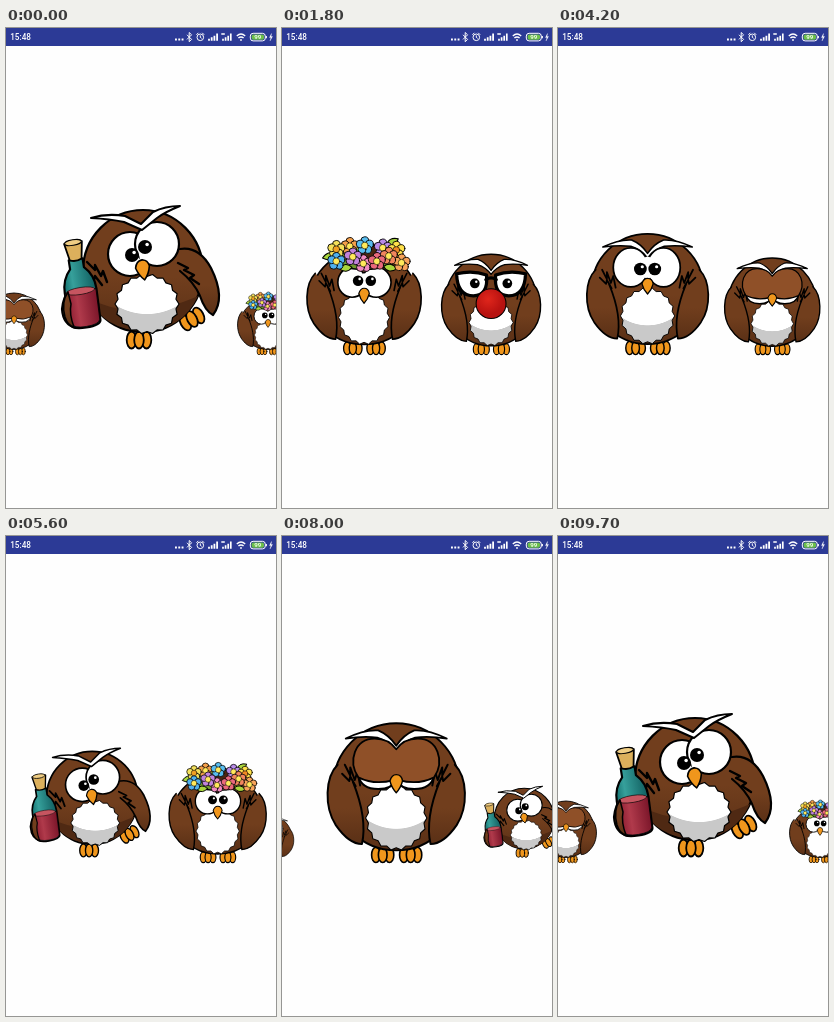
Write an HTML page that moves like this. It is 270 by 480 pixels and loops after 9800 ms.

```html
<!DOCTYPE html>
<html lang="en">
<head>
<meta charset="utf-8">
<title>Owl carousel</title>
<style>
html, body { margin: 0; width: 100%; height: 100%; overflow: hidden; background: #fefefe; }
svg { display: block; width: 100%; height: 100%; }
text { font-family: Roboto, sans-serif; font-weight: 500; fill: #fff; }
.owl { stroke: #000; stroke-linejoin: round; stroke-linecap: round; }
</style>
</head>
<body>
<svg viewBox="0 0 270 480">
  <defs>
    <radialGradient id="shaded" cx=".5" cy="-.2" fy="-.2" r="1.2">
      <stop offset=".72" stop-color="#fff"/><stop offset=".73" stop-color="#c9c9c9"/>
    </radialGradient>
    <linearGradient id="brown" x2="0" y2="1">
      <stop offset=".55" stop-color="#713e1d"/><stop offset="1" stop-color="#5a3016"/>
    </linearGradient>
    <linearGradient id="glass">
      <stop stop-color="#14706f"/><stop offset=".3" stop-color="#36a09b"/><stop offset="1" stop-color="#115e60"/>
    </linearGradient>
    <linearGradient id="wine">
      <stop stop-color="#8d1d31"/><stop offset=".35" stop-color="#b03a4b"/><stop offset="1" stop-color="#7a1529"/>
    </linearGradient>
    <radialGradient id="nose" cx=".4" cy=".35">
      <stop stop-color="#e0261c"/><stop offset="1" stop-color="#b81210"/>
    </radialGradient>
  </defs>
  <g id="carousel"></g>
  <rect width="270" height="18" fill="#2c3a96"/>
  <text x="4.2" y="12" font-size="8.2">15:48</text>
  <g fill="none" stroke="#fff" stroke-width="1">
    <path d="M169 11.500h1.900M172.300 11.500h1.900M175.600 11.500h1.900" stroke-width="1.900"/>
    <path d="M181 6.800l4.600 4.600-2.400 2.300V4.500l2.400 2.300-4.600 4.600"/>
    <circle cx="194.300" cy="9.300" r="3.300"/>
    <path d="M194.300 7.400v2l1.300.9M190.400 6.800l2-2M198.200 6.800l-2-2"/>
    <path d="M203 12.700v-2M205.700 12.700v-3.500M208.400 12.700v-5M211.100 12.700V5.500" stroke-width="1.800"/>
    <path d="M217 12.700v-2M219.600 12.700v-3.500M222.200 12.700v-5M224.800 12.700V5.500M215.300 6h3.500" stroke-width="1.700"/>
    <path d="M230.800 8q4.200-3.800 8.400 0M232.400 10q2.600-2.200 5.200 0" stroke-width="1.400"/>
    <circle cx="235" cy="12" r=".6"/>
    <rect x="244.300" y="5.300" width="15" height="7.600" rx="2.800"/>
    <rect x="245.600" y="6.500" width="12.400" height="5.200" rx="1.600" fill="#6cc04a" stroke="none"/>
    <path d="M260.300 8v2.300" stroke-width="1.200"/>
    <path d="M265.500 5.500l-2 4h1.500l-1 3.500 2.500-4.500h-1.500z" fill="#fff" stroke-width=".3"/>
  </g>
  <text x="251.800" y="11.400" font-size="6.200" text-anchor="middle">99</text>
</svg>
<script>
const BROWN = 'url(#brown)', ORANGE = '#f0961c';

const path = (d, fill = 'none', width = 2.2) => `<path d="${d}" fill="${fill}" stroke-width="${width}"/>`;
const oval = (x, y, rx, ry = rx, fill = '#fff', width = 2.2) =>
  `<ellipse cx="${x}" cy="${y}" rx="${rx}" ry="${ry}" fill="${fill}" stroke-width="${width}"/>`;
const group = (transform, content) => `<g transform="${transform}">${content}</g>`;
const bothSides = content => content + group('scale(-1 1)', content);

function belly(cx, cy, rx, ry, fill) {
  const points = Array.from({ length: 36 }, (_, i) => {
    const a = i * Math.PI / 18, r = i % 2 ? 1 : .92;
    return `${(cx + rx * r * Math.sin(a)).toFixed(1)} ${(cy - ry * r * Math.cos(a)).toFixed(1)}`;
  });
  return path(`M${points.join('L')}Z`, fill, 1.2);
}

const pupil = (x, y, r = 7) =>
  oval(x, y, r, r, '#000', 0) + oval(x + r * .3, y - r * .35, r * .25, r * .25, '#fff', 0);

const foot = (x, y, angle = 0) => group(`translate(${x} ${y}) rotate(${angle})`,
  [-7.5, 7.5, 0].map(dx => oval(dx, 0, 4.8, 8.5, ORANGE, 1.8)).join(''));

const beak = (x, y) =>
  path(`M${x - 7} ${y - 3}Q${x - 5} ${y - 10} ${x} ${y - 10}Q${x + 6} ${y - 10} ${x + 7} ${y - 3}Q${x + 5} ${y + 5} ${x} ${y + 10}Q${x - 5} ${y + 5} ${x - 7} ${y - 3}Z`, ORANGE, 1.6);

const wing = path('M-65-109C-79-95-80-62-67-42C-58-29-49-21-38-21C-33-44-40-70-48-90', BROWN);
const tuft = path('M-57-109l6 12 0-9 5 14 3-9 3 15M-60-99l8 8 1-5 6 11', 'none', 2.2);
const brows = path('M-56-138Q-36-148-20-147Q-8-142 0-130Q8-142 20-147Q36-148 56-138Q36-141 21-139Q8-135 0-124Q-8-135-21-139Q-36-141-56-138Z', '#fff', 2);

function standing(face, bellyFill = 'url(#shaded)', top = -155) {
  const ry = (-14 - top) / 2;
  return foot(-15, -9) + foot(16, -9) +
    oval(0, top + ry, 70, ry, BROWN) +
    bothSides(wing + tuft) +
    belly(0, -50, 34, 36, bellyFill) + face;
}

const plainFace = brows + oval(-21, -112, 22, 25) + oval(20, -112, 21, 25) +
  oval(0, -112, 8, 14, '#fff', 0) + pupil(-9, -110, 8) + pupil(9, -110, 8) + beak(0, -88);

const sleepyFace = brows +
  bothSides(path('M-42-97Q-39-82-20-82Q-4-82 0-93L0-102Z', '#fff')) +
  path('M-42-95C-54-113-46-138-24-138Q-8-138 0-126Q8-138 24-138C46-138 54-113 42-95Q24-86 3-92L-3-92Q-24-86-42-95Z', '#8f5028', 2) +
  beak(0, -88);

const lens = path('M-53-126Q-28-132-7-124Q-4-93-27-92Q-52-92-53-126Z', '#fff', 0) +
  path('M-53-126Q-28-132-7-124Q-4-93-27-92Q-52-92-53-126Z', 'none', 5);
const clownFace = brows + group('translate(0 1)', bothSides(lens)) +
  path('M-8-116Q0-121 8-116', 'none', 5) +
  pupil(-25, -110, 7.5) + pupil(25, -110, 7.5) + oval(0, -79, 23, 23, 'url(#nose)', 1.6);

function flower(x, y, color, core = '#ffe95a') {
  const petals = Array.from({ length: 5 }, (_, i) => {
    const a = i * Math.PI * .4;
    return oval((x + 6.5 * Math.sin(a)).toFixed(1), (y - 6.5 * Math.cos(a)).toFixed(1), 5.2, 5.2, color, 1.2);
  }).join('');
  return petals + oval(x, y, 4.5, 4.5, core, .8);
}

const leaf = (x, y, angle) => group(`translate(${x} ${y}) rotate(${angle})`,
  path('M0 0Q8-9 18 0Q8 9 0 0Z', '#a9d63c', 1.4));

const crown = oval(0, -131, 46, 17, '#6f9a2d') + oval(7, -137, 26, 9, '#4a2510') +
  [[-38, -134, 165], [-16, -117, 175], [26, -118, 10], [40, -128, 15], [-4, -140, 200], [30, -146, -30]]
    .map(a => leaf(...a)).join('') +
  flower(-19, -145, '#f5a04a') + flower(1, -146, '#58bdf0') + flower(25, -143, '#b98be8') +
  flower(43, -140, '#ffe14a', '#f08a24') + flower(-37, -141, '#f4e05a', '#f0a024') +
  flower(-37, -125, '#4fb0ee') + flower(50, -123, '#f7a35a') + flower(33, -132, '#f2855e') +
  flower(-1, -122, '#f28ac0') + flower(17, -125, '#e9687c') + flower(-15, -131, '#c183dc');

const flowerFace = oval(-16, -97, 19, 20) + oval(16, -97, 20, 20) + oval(0, -97, 6, 12, '#fff', 0) +
  pupil(-8, -99, 7) + pupil(9, -99, 7) + beak(0, -79) + crown;

const bottle =
  path('M-7-28L-7-19Q-16-10-16 4L-15 36Q-14 41 0 41Q14 41 15 36L16 4Q16-10 7-19L7-28Z', 'url(#glass)') +
  path('M-15.500 4Q0 10 15.500 4L14.500 35Q13 40 0 40Q-13 40-14.500 35Z', 'url(#wine)', .8) +
  oval(0, 4, 14.500, 3.500, '#c65560', .6) +
  path('M-9-45Q0-49 9-45L6-28Q0-25-6-28Z', '#dcb05c', 1.800) +
  oval(0, -45, 8.500, 2.800, '#efcd84', 1);

// Laid out on the stage, then moved to a bottom-centre origin.
const tipsy = group('translate(-135 -322)',
  foot(133, 312, 0) + foot(186, 291, -28) +
  path('M84 245Q58 258 56 281Q57 297 70 300Q92 298 92 268Z', BROWN) +
  oval(137, 243, 60, 61, BROWN) +
  path('M82 270Q130 296 192 268Q176 303 137 303Q99 302 82 270Z', '#4f2913', 0) +
  path('M174 221Q193 218 205 240Q220 270 207 287Q199 283 194 268Q188 254 174 243', BROWN) +
  path('M172 235l10 5-4 2 10 5-4 3 9 6M81 234l8 8 0-5 6 11 2-5 4 11M79 246l9 6 1-4 7 9', 'none', 2.400) +
  belly(141, 276, 32, 30, 'url(#shaded)') +
  oval(124, 226, 22, 22) + oval(151, 216, 22, 22) + path('M134 232L143 228L140 211L131 214Z', '#fff', 0) +
  pupil(126, 227) + pupil(139, 219) +
  path('M85 190Q101 185 119 188L135 196L147 184Q159 178 174 178Q159 184 151 190L136 202L118 194Q104 191 85 190Z', '#fff', 2) +
  group('rotate(-10 137 242)', beak(137, 242)) +
  group('translate(74 259) rotate(-9)', bottle) +
  path('M62 264Q55 274 59 289Q62 298 68 299Q63 286 65 276Z', BROWN, 1.500));

const owls = [
  { art: tipsy, base: 322 },
  { art: standing(flowerFace, '#fff', -140), base: 327 },
  { art: standing(clownFace), base: 327 },
  { art: group('translate(3 0) scale(1.03 1.01)', standing(plainFace)), base: 327 },
  { art: standing(sleepyFace), base: 327 }
];
const carousel = document.getElementById('carousel');
carousel.innerHTML = owls.map(o => `<g class="owl">${o.art}</g>`).join('');

// start ms, end ms, target position, ease-out power
const swipes = [
  [300, 700, 1, 1], [900, 1300, 2, 1], [1500, 2000, 1, .95], [2200, 2700, 0, 1],
  [2800, 3700, -2, 1.5], [4100, 5000, 0, 1.75], [5300, 6300, 1, 1.41],
  [6300, 7100, 0, 1.41], [7300, 8300, -1, 1.5], [8300, 9300, 0, 1.5]
];
const LOOP = 9800, SPACING = 127;

function position(t) {
  let p = 0;
  for (const [start, end, target, power] of swipes) {
    if (t < start) break;
    const u = Math.min(1, (t - start) / (end - start));
    p += (target - p) * (1 - (1 - u) ** power);
  }
  return p;
}

const began = performance.now();
function draw() {
  const p = position(Math.max(0, performance.now() - began) % LOOP);
  owls.forEach(({ base }, i) => {
    const d = (i - p + 12.5) % 5 - 2.5;
    const scale = Math.max(.1, 1 - .6 * Math.abs(d));
    carousel.children[i].setAttribute('transform', `translate(${135 + SPACING * d} ${base}) scale(${scale})`);
  });
  requestAnimationFrame(draw);
}
draw();
</script>
</body>
</html>
```
